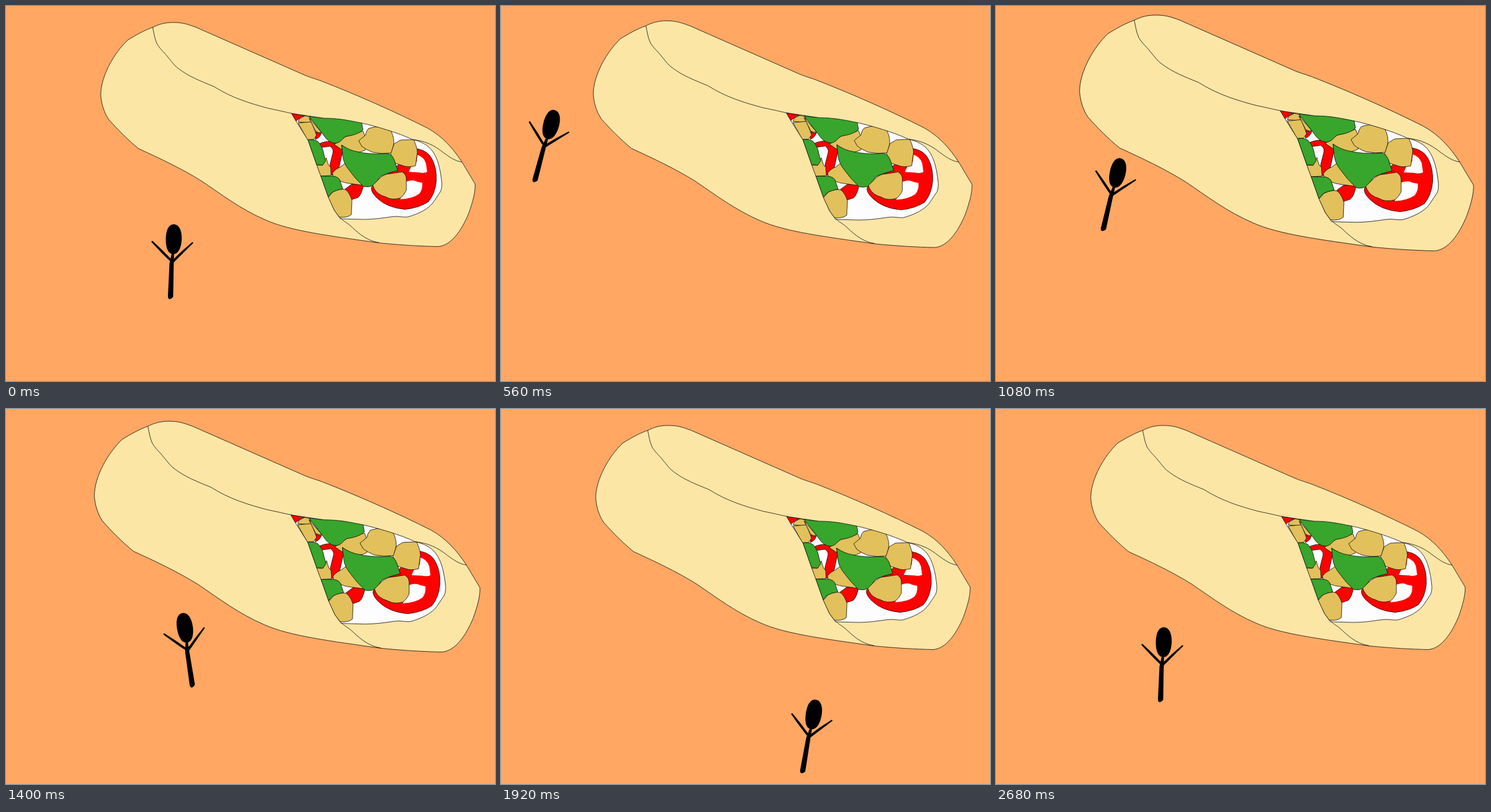
An HTML page with a canvas for the animation above (2.72 s loop, 800 by 615 pixels).

```html
<!DOCTYPE html>
<html>
<head>
<meta charset="utf-8">
<title>Burrito</title>
<style>
html, body { margin: 0; width: 100%; height: 100%; overflow: hidden; background: #ffa763; }
canvas { display: block; }
</style>
</head>
<body>
<canvas id="stage" width="800" height="615"></canvas>
<script>
const ctx = document.getElementById('stage').getContext('2d');
const LOOP = 2720, STEP = 40;
const ORANGE = '#ffa763', DOUGH = '#fce6a6', GREEN = '#38a52c';
const POTATO = '#e2c05b', RED = '#ff0000', CREAM = '#fdfcff';

const shape = (color, d) => ({ color, path: new Path2D(d) });

const wrap = shape(DOUGH, `M240 35 C226 40 212 48 199 56 C177 77 155 115 155 146
  C156 160 160 174 168 186 C183 203 200 220 217 234 C252 250 288 267 320 287
  C351 308 385 334 425 351 C465 369 530 377 610 388.5 C645 392 680 394 707 394.5
  C728 393 745 369 757 340 C764 320 768 305 767.5 292 L746 256
  C731 233 714 214 690 200.5 C640 175 570 144 517 123.5 C505 119 500 118 490 114
  L311 35 C297 30 290 27 273 27 C260 27 250 30 240 35Z`);

const folds = new Path2D(`M240 35 C242 44 243 53 247 62 C253 72 258 75 265 84
  C272 92 276 99 284 104 C300 116 318 123 340 132 C370 151 400 160 430 168 C450 172 457 174 467 176
  M547 347 C552 353 557 355 562 359 C573 369 588 385 610 388
  M665 219 C685 221 700 228 715 240 C726 248 734 254 746 256`);

const opening = shape(CREAM, `M467 176 C485 179 500 181 520 184 C545 184 562 188 582 192
  C605 197 642 208 665 219 C679 222 690 228 697 237 C707 250 711 270 713 290
  C713 296 713 299 711 304 L699 322 C691 333 675 341 657 346 C649 347 642 344 632 345.5
  C615 348 600 350 585 350 L547 349 L537 335 L527 313 L515 279 L508 260 L494 220 L474 188Z`);

const filling = [
  shape(RED, 'M467 176 L490 180 L483 182 L474 189Z'),
  shape(POTATO, 'M478 190 L480 185 L489 180 L497 182 L501 192Z'),
  shape(POTATO, 'M496 184 L516 207 Q512 209 507 206 L499 191Z'),
  shape(RED, 'M507 206 Q512 210 516 208 Q514 216 506 219Z'),
  shape(POTATO, 'M478 192 L499 190 C503 198 506 206 508 212 L503 219 L493 219Z'),
  shape(RED, 'M512 226 Q525 220 537 223 Q547 227 551 237 L545 264 L535 277 L531 277 L530 260 L535 240 Q536 234 530 230 L516 232Z'),
  shape(POTATO, 'M537 227 L556 214 L584 205 L591 223 L588 236 Q574 243 565 239 L549 228 L550 236Z'),
  shape(GREEN, 'M496 181 Q520 185 533 183 Q555 187 567 187 L582 192 L584 203 Q577 211 556 214 C550 217 548 225 538 225 Q527 224 519 211Z'),
  shape(POTATO, 'M508 261 L518 261 L524 249 Q527 263 531 264 L532 278 L514 279Z'),
  shape(GREEN, 'M494 220 Q504 218 510 222 Q518 230 520 243 L523 254 L518 261 L508 260Z'),
  shape(RED, 'M555 300 L566 292 L585 293 Q582 309 576 314 L564 318Z'),
  shape(POTATO, 'M534 274 Q539 267 547 264 L555 258 L571 276 L584 294 L562 291 Q544 289 535 279Z'),
  shape(GREEN, 'M515 279 L535 279 Q543 280 546 285 L551 300 Q540 302 533 306 L527 313Z'),
  shape(POTATO, 'M527 314 L535 305 Q547 299 555 301 C560 304 564 312 566 319 L565 342 Q558 348 545 346 L537 335Z'),
  shape(RED, 'M672 234 Q690 237 697 251 Q705 266 704 287 Q702 308 691 321 Q676 331 653 333.5 Q623 331 606 314 Q596 304 598 297 L640 262Z'),
  shape(CREAM, 'M673 244 Q684 248 687 258 L689 272 Q683 275 676 273 L659 272 L663 263 L672 255Z'),
  shape(CREAM, 'M655 288 Q666 284 672 288 L681 290 Q682 301 676 308 Q665 316 645 317Z'),
  shape(POTATO, 'M629 242 L635 226 L645 220 L667 219 C670 226 673 235 673 240 L670 262 Q657 265 650 262 L637 258Z'),
  shape(POTATO, 'M577 221 L588 212 Q589 205 593 201 Q604 197 613 198 L630 205 Q636 218 634 228 L630 241 Q615 243 600 240 Q588 235 582 230Z'),
  shape(GREEN, 'M549 228 Q562 237 575 239 C592 243 610 243 625 242 Q632 244 635 252 L641 270 Q622 274 612 280 L602 294 Q594 298 585 296 Q571 283 562 270 Q552 258 551 246Z'),
  shape(POTATO, 'M600 294 L612 282 Q620 275 629 275 L648 272 Q655 276 655 284 L655 302 Q651 311 645 315 Q631 319 621 313 Q607 309 602 299Z')
];

const body = new Path2D(`M271.5 404 L275 404 L274.5 420 C274 440 274 460 273.5 477
  Q270 481.5 266.5 480.5 Q264.5 479 265 474 L267.5 422 Z
  M274.5 358 C284 358 288 370 287.5 382 C287 396 282 407 274 407
  C265 407 261.5 396 261.5 384 C261.5 370 265 358 274.5 358Z`);
const arms = new Path2D(`M237.5 386.5 L239.5 385 Q256 400 273 418 L271 421 Q255 406 237.5 386.5Z
  M306.5 388.5 L305 387 Q288 401 271 418 L273 422 Q287 408 306.5 388.5Z`);

// [time, value...] rows, linear between neighbours
const SWELL = [[0, 1], [1049, 1.0214], [1142, 1.1137], [1492, 1]];
const WALK = [[0, 270, 450], [660, 25.5, 225.2], [1400, 300.7, 426], [1680, 402, 496],
  [2000, 530, 591], [2667, 270, 450]];
const TILT = [[0, 0], [320, 1.5], [560, 13], [840, -21.8], [1080, 11.1], [1400, -10.5],
  [1680, -5.4], [1920, 7.8], [2000, -8], [2240, -16], [2667, 0]];

function at(track, t) {
  const next = track.findIndex(row => row[0] > t);
  if (next < 0) return track[track.length - 1].slice(1);
  const a = track[next - 1], b = track[next];
  const k = (t - a[0]) / (b[0] - a[0]);
  return a.slice(1).map((v, i) => v + (b[i + 1] - v) * k);
}

function paint({ color, path }, outlined = true) {
  ctx.fillStyle = color;
  ctx.fill(path);
  if (outlined) ctx.stroke(path);
}

function drawBurrito(scale) {
  ctx.save();
  ctx.translate(505, 259);
  ctx.scale(scale, scale);
  ctx.translate(-505, -259);
  ctx.strokeStyle = '#000';
  ctx.lineWidth = 0.75;
  ctx.lineJoin = 'round';
  paint(wrap);
  ctx.save();
  paint(opening, false);
  ctx.clip(opening.path);
  for (const piece of filling) paint(piece, piece.color !== CREAM);
  ctx.restore();
  ctx.stroke(opening.path);
  ctx.stroke(folds);
  ctx.restore();
}

function drawFigure([x, y], degrees) {
  ctx.save();
  ctx.translate(x, y);
  ctx.rotate(degrees * Math.PI / 180);
  ctx.translate(-270, -450);
  ctx.fillStyle = '#000';
  ctx.fill(body);
  ctx.fill(arms);
  ctx.restore();
}

function frame(now) {
  const t = Math.floor((now % LOOP) / STEP) * STEP;
  ctx.fillStyle = ORANGE;
  ctx.fillRect(0, 0, 800, 615);
  drawBurrito(at(SWELL, t)[0]);
  drawFigure(at(WALK, t), at(TILT, t)[0]);
  requestAnimationFrame(() => frame(performance.now() - start));
}

const start = performance.now();
frame(0);
</script>
</body>
</html>
```
